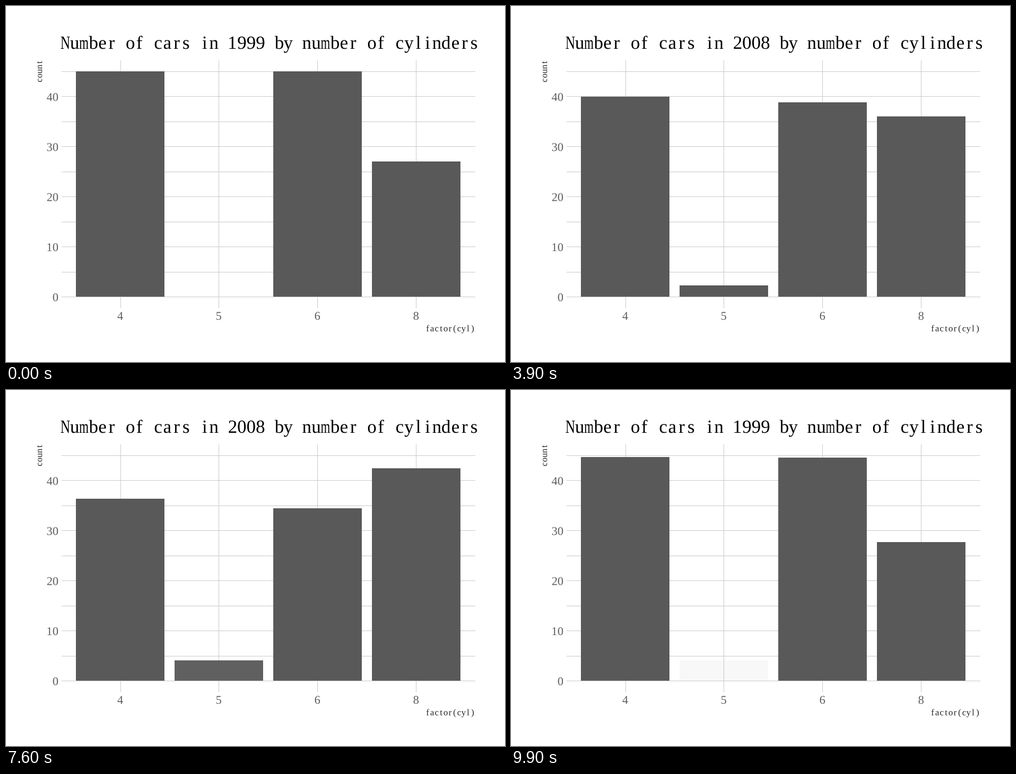
A matplotlib script that plays this animation: 885 by 632 pixels, repeating every 10000 ms.

```python
import matplotlib.pyplot as plt
from matplotlib.animation import FuncAnimation
from matplotlib.patches import PathPatch, Rectangle
from matplotlib.path import Path
from matplotlib.textpath import TextPath
from matplotlib.transforms import Affine2D

W, H, DPI = 885, 632, 100
FRAMES, INTERVAL = 100, 100
HOLD = MOVE = 25

LEFT, RIGHT, TOP, BOTTOM = 97.6, 832.2, 96, 536
BASE, UNIT = 516, 400 / 45
STEP = (RIGHT - LEFT) / 4.2
BAR_W = 0.9 * STEP
CENTERS = [LEFT + (0.6 + i) * STEP for i in range(4)]

CYL = "4568"
COUNTS = {1999: (45, 0, 45, 27), 2008: (36, 4, 34, 43)}
BAR, GRID, TICK, NAME = "#595959", "#cccccc", "#5c5c5c", "#262626"

fig = plt.figure(figsize=(W / DPI, H / DPI), dpi=DPI, facecolor="white")
ax = fig.add_axes([0, 0, 1, 1])
ax.set_xlim(0, W)
ax.set_ylim(H, 0)
ax.axis("off")


def y_of(value):
    return BASE - value * UNIT


def mono_path(text, x, y, em, align=0.0, angle=0):
    """Half-width setting: each glyph is centred in a cell of half an em."""
    cell = em / 2
    start = -align * cell * len(text)
    place = Affine2D().rotate_deg(angle).scale(1, -1).translate(x, y)
    glyphs = []
    for i, char in enumerate(text):
        if char == " ":
            continue
        glyph = TextPath((0, 0), char, size=em, prop={"family": "Liberation Serif"})
        box = glyph.get_extents()
        fit = min(1, 0.97 * cell / box.width)
        to_cell = Affine2D().translate(-(box.x0 + box.x1) / 2, 0).scale(fit, 1)
        to_cell.translate(start + (i + 0.5) * cell, 0)
        glyphs.append(Path(glyph.vertices, glyph.codes).transformed(to_cell + place))
    return Path.make_compound_path(*glyphs)


def draw_text(path, color):
    return ax.add_patch(PathPatch(path, facecolor=color, linewidth=0, zorder=4))


def title_path(year):
    text = f"Number of cars in {year} by number of cylinders"
    return mono_path(text, 97, 76, 32.95)


# Grid and axis labels
line = dict(color=GRID, linewidth=0.72, solid_capstyle="butt", snap=True, zorder=1)
for value in range(0, 50, 5):
    y = y_of(value)
    ax.plot([LEFT, RIGHT], [y, y], **line)
    if value % 10 == 0:
        draw_text(mono_path(str(value), 93, y + 8, 21, align=1), TICK)
for x, name in zip(CENTERS, CYL):
    ax.plot([x, x], [TOP, BOTTOM], **line)
    draw_text(mono_path(name, x, 557, 21, align=0.5), TICK)
draw_text(mono_path("count", 64, TOP, 15.9, align=1, angle=90), NAME)
draw_text(mono_path("factor(cyl)", 831.5, 577.5, 15.9, align=1), NAME)

titles = {year: title_path(year) for year in COUNTS}
title = draw_text(titles[1999], "black")
bars = [
    ax.add_patch(Rectangle((x - BAR_W / 2, BASE), BAR_W, 0, facecolor=BAR,
                           linewidth=0, snap=True, zorder=2))
    for x in CENTERS
]


def update(frame):
    half, k = divmod(frame, HOLD + MOVE)
    p = max(0, k - HOLD) / MOVE
    start, end = (2008, 1999) if half else (1999, 2008)
    title.set_path(titles[end if p > 0.5 else start])
    for bar, a, b in zip(bars, COUNTS[start], COUNTS[end]):
        # A bar grows in from zero, but leaves by fading at full height
        leaving = b == 0
        height = (a if leaving else a + (b - a) * p) * UNIT
        bar.set_y(BASE - height)
        bar.set_height(height)
        bar.set_alpha(1 - p if leaving else 1)
        bar.set_visible(height > 0)
    return [title, *bars]


anim = FuncAnimation(fig, update, frames=FRAMES, interval=INTERVAL,
                     repeat=True, repeat_delay=0, blit=False)
plt.show()
```
